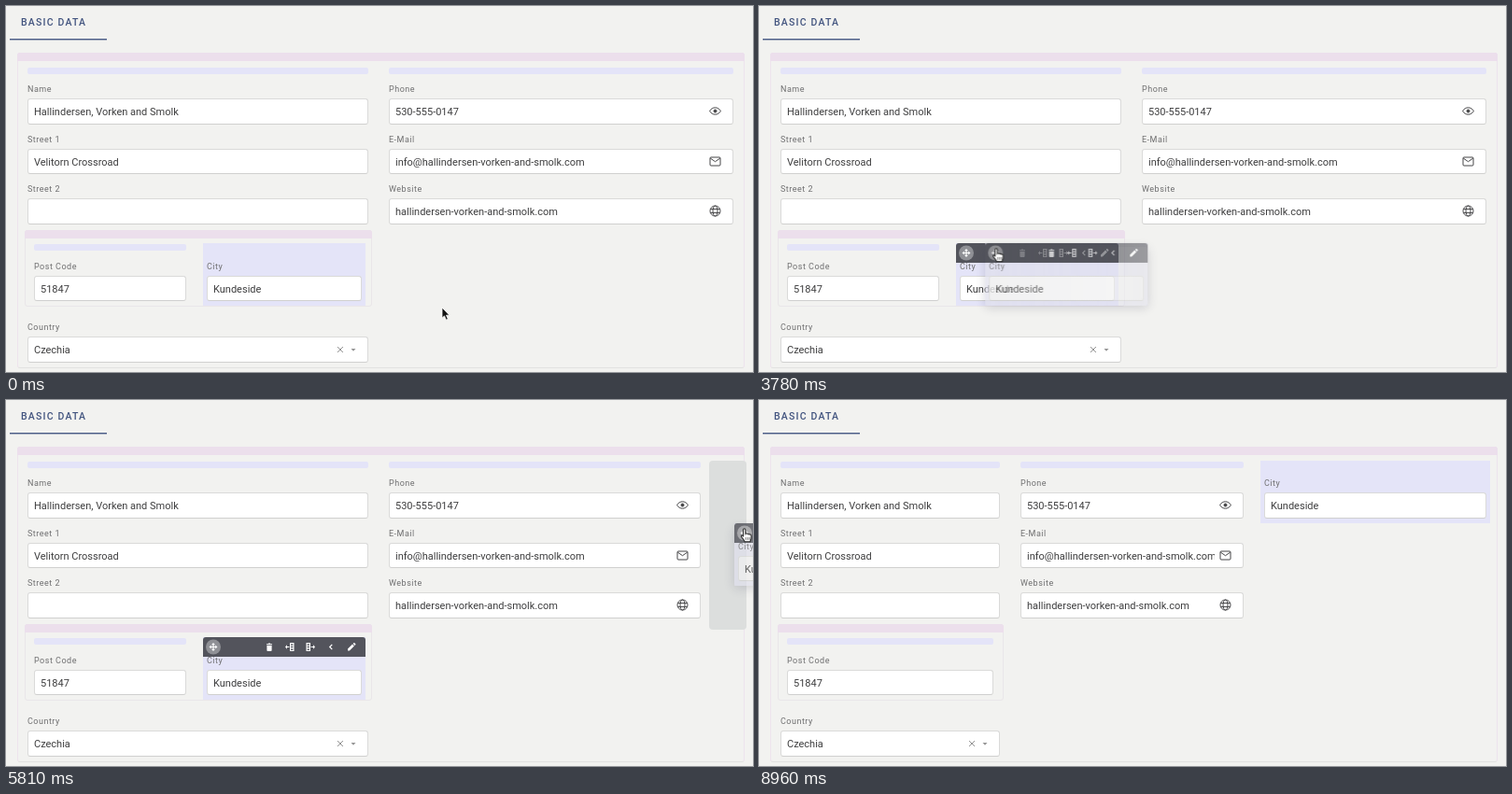
Recreate the animation shown at these times as an HTML page. Size 800 by 392 pixels, loop 9030 ms.

```html
<!DOCTYPE html>
<html lang="en">
<head>
<meta charset="utf-8">
<title>Form layout editor</title>
<style>
  html, body { margin: 0; width: 100%; height: 100%; overflow: hidden; background: #f2f2f0; }
  * { box-sizing: border-box; }
  .stage, .stage div, .cursor, .cursor svg { position: absolute; }
  .stage {
    left: 0; top: 0; width: 800px; height: 392px; overflow: hidden;
    font: 11px/28px Roboto, sans-serif; color: #3e3e3f; white-space: nowrap;
    animation: layout 9.03s step-end infinite;
  }

  .tab { left: 4px; top: 0; width: 104px; height: 36px; border-bottom: 1px solid #4a5c86;
    box-shadow: 0 1px rgba(74,92,134,.45);
    padding-left: 12px; font-size: 10.5px; line-height: 36px; font-weight: 500;
    letter-spacing: 1.2px; color: #42547f; }
  .outer { left: 12px; top: 50px; width: 779px; height: 338px; border: 1px solid #ede3ed; border-bottom-color: #e2e2e1; border-radius: 3px; }
  .nested { left: 20px; top: 239.5px; width: var(--nest); height: 82px; border: 1px solid #e9e6e9; border-radius: 3px; }
  .bar { left: -1px; right: -1px; top: -1px; height: 9px; background: #ecdfec; border-radius: 3px 3px 0 0; }
  .strip { height: 7.5px; background: #e4e4f8; border-radius: 2px; }

  .field { height: 43px; }
  .col1 { left: 23px; width: var(--w1); }
  .col2 { left: var(--x2); width: var(--w2); }
  .post { left: 30px; width: var(--post); }
  .label { left: 0; top: 0; font-size: 9px; line-height: 12px; letter-spacing: .5px; color: #6f6f70; }
  .input { left: 0; right: 0; top: 16px; height: 27.5px; background: #fff; border: 1px solid #dadad9; border-bottom-color: #d0d0cf; border-radius: 3px; }
  .input span { position: absolute; left: 6px; right: 30px; top: 0; overflow: hidden; }
  .input svg { position: absolute; right: 11px; top: 5px; width: 15px; height: 15px; }
  .input .clear { right: 7px; width: 26px; }

  .drop { left: 753px; top: 65px; width: 40px; height: 181px; background: #dcdedd; border-radius: 4px; opacity: var(--drop); }

  .city { left: var(--cx); top: var(--cy); width: var(--cw); height: 67px; }
  .tint { inset: 0; background: #e4e4f8; }
  .city .label, .ghost .label { left: 4px; top: 18.5px; }
  .city .input, .ghost .input { left: 4px; right: 4px; top: 34.5px; }
  .tools { left: 0; top: 0; width: 174px; height: 21px; background: #53545c; border-radius: 3px 3px 0 0; }
  .tools svg { display: block; }
  .city .tools { animation: tools 9.03s step-end infinite; }
  .spot1 { animation: handle 9.03s step-end infinite; }
  .spot2 { animation: addLeft 9.03s step-end infinite; }

  .ghost { left: 211px; top: 254px; width: 174px; height: 67px;
    animation: drag 9.03s linear infinite, ghost 9.03s step-end infinite; }
  .ghost .fade { inset: 0; -webkit-mask: linear-gradient(90deg, rgba(0,0,0,.82), rgba(0,0,0,.55));
    mask: linear-gradient(90deg, rgba(0,0,0,.82), rgba(0,0,0,.55)); }
  .ghost .halo { inset: 4px 0 0; box-shadow: 0 2px 12px rgba(60,60,90,.2); border-radius: 3px; }
  .ghost .tint { background: rgba(222,222,235,.85); }
  .ghost .input { background: #eeeeef; }

  .cursor { left: 0; top: 0; animation: move 9.03s linear infinite; }
  .cursor svg { overflow: visible; width: 16px; height: 20px; }
  .arrow { animation: arrow 9.03s step-end infinite; }
  .hand { left: -.5px; top: -1px; animation: hand 9.03s step-end infinite; }

  @keyframes layout {
    0% { --w1: 365px; --x2: 410px; --w2: 369px; --nest: 372px; --post: 163px;
      --cx: 211px; --cy: 254px; --cw: 174px; --drop: 0; }
    57.36% { --w1: 365px; --x2: 410px; --w2: 334px; --nest: 372px; --post: 163px;
      --cx: 211px; --cy: 254px; --cw: 174px; --drop: 1; }
    79.84%, 100% { --w1: 235px; --x2: 280px; --w2: 238.5px; --nest: 242px; --post: 221px;
      --cx: 537px; --cy: 64.5px; --cw: 246px; --drop: 0; }
  }
  @keyframes tools { 0% { opacity: 0; } 14.73% { opacity: 1; } 79.84%, 100% { opacity: 0; } }
  @keyframes handle { 0% { opacity: 0; } 34.11% { opacity: 1; } 79.84%, 100% { opacity: 0; } }
  @keyframes addLeft { 0% { opacity: 0; } 21.7% { opacity: 1; } 28.68%, 100% { opacity: 0; } }
  @keyframes ghost { 0% { opacity: 0; } 39.53% { opacity: 1; } 70.54%, 100% { opacity: 0; } }
  @keyframes arrow { 0% { opacity: 1; } 17.05% { opacity: 0; } 70.54%, 100% { opacity: 1; } }
  @keyframes hand { 0% { opacity: 0; } 17.05% { opacity: 1; } 70.54%, 100% { opacity: 0; } }
  @keyframes drag {
    0%, 38.76% { transform: translate(0, 0); }
    41.86% { transform: translate(31px, 0); }
    46.51% { transform: translate(155px, -33px); }
    53.49% { transform: translate(423px, -98px); }
    57.36% { transform: translate(525px, -115px); }
    64.34% { transform: translate(569px, -122px); }
    69.77%, 100% { transform: translate(554px, -120px); }
  }
  @keyframes move {
    0%, 8.53% { transform: translate(467px, 323px); }
    13.95% { transform: translate(387px, 298px); }
    17.72% { transform: translate(345px, 268px); }
    20.16% { transform: translate(326px, 261px); }
    23.26%, 26.58% { transform: translate(307px, 260px); }
    32.12% { transform: translate(240px, 261px); }
    34.88%, 38.76% { transform: translate(222px, 261px); }
    41.86% { transform: translate(254px, 261px); }
    46.51% { transform: translate(388px, 226px); }
    53.49% { transform: translate(659px, 159px); }
    57.36% { transform: translate(754px, 145px); }
    64.34% { transform: translate(791px, 139px); }
    69.77%, 84% { transform: translate(776.5px, 140px); }
    89.15% { transform: translate(750px, 210px); }
    94.57%, 100% { transform: translate(690px, 400px); }
  }
</style>
</head>
<body>
<svg width="0" height="0" style="position:absolute">
  <defs>
    <g id="icons" fill="#fff" stroke="none">
      <path d="M11 6l2 2.3h-1.4v1.6h1.6V8.500l2.300 2-2.300 2v-1.400h-1.600v1.600H13l-2 2.300-2-2.300h1.400v-1.600H8.800v1.400l-2.300-2 2.300-2v1.400h1.600V8.300H9z"/>
      <path d="M68 7.300h1.700l.5-.8h1.600l.5.8H74v1h-6zM68.400 9h5.200v5c0 .6-.3.9-.9.900h-3.400c-.6 0-.9-.3-.9-.9z"/>
      <g id="add"><path d="M88 10h2.400V8.200l2 2.300-2 2.300V11H88z" transform="rotate(180 90.200 10.500)"/>
        <path d="M93 6h4.500v9H93zm1.200 1.200v1.500h2.100V7.200zm0 2.600v1.500h2.100V9.800zm0 2.600v1.500h2.100v-1.500z" fill-rule="evenodd"/></g>
      <use href="#add" transform="matrix(-1 0 0 1 208 0)"/>
      <path d="M138.300 7.800l-2.600 2.700 2.600 2.700" fill="none" stroke="#fff" stroke-width="1.200"/>
      <path d="M155 14.500v-1.900l5-5 1.900 1.900-5 5zM160.600 7l.8-.8c.3-.3.600-.3.900 0l1 1c.3.3.3.6 0 .9l-.8.800z"/>
    </g>
  </defs>
</svg>

<div class="stage">
  <div class="tab">BASIC DATA</div>
  <div class="outer"><div class="bar"></div></div>
  <div class="strip col1" style="top:65.5px"></div>
  <div class="strip col2" style="top:65.5px"></div>
  <div class="nested"><div class="bar"></div></div>
  <div class="strip post" style="top:254.5px"></div>

  <div class="field col1" style="top:83px"><div class="label">Name</div><div class="input"><span>Hallindersen, Vorken and Smolk</span></div></div>
  <div class="field col1" style="top:136.5px"><div class="label">Street 1</div><div class="input"><span>Velitorn Crossroad</span></div></div>
  <div class="field col1" style="top:190px"><div class="label">Street 2</div><div class="input"></div></div>
  <div class="field post" style="top:272.5px"><div class="label">Post Code</div><div class="input"><span>51847</span></div></div>
  <div class="field col1" style="top:338px"><div class="label">Country</div><div class="input"><span>Czechia</span>
    <svg class="clear" viewBox="0 0 26 15"><path d="M1 5l6 6M7 5l-6 6" stroke="#959595" fill="none"/><path d="M15.500 7h5l-2.500 2.700z" fill="#959595"/></svg></div></div>

  <div class="field col2" style="top:83px"><div class="label">Phone</div><div class="input"><span>530-555-0147</span>
    <svg viewBox="0 0 15 15" fill="none" stroke="#454547"><path d="M1.600 7.500C4.200 2.600 10.800 2.600 13.400 7.500 10.800 12.400 4.200 12.400 1.600 7.500z"/><circle cx="7.500" cy="7.500" r="1.500" fill="#454547"/></svg></div></div>
  <div class="field col2" style="top:136.5px"><div class="label">E-Mail</div><div class="input"><span>info@hallindersen-vorken-and-smolk.com</span>
    <svg viewBox="0 0 15 15" fill="none" stroke="#454547"><rect x="2" y="3" width="11" height="9" rx="1"/><path d="M2.200 4l5.300 3.700L12.800 4"/></svg></div></div>
  <div class="field col2" style="top:190px"><div class="label">Website</div><div class="input"><span>hallindersen-vorken-and-smolk.com</span>
    <svg viewBox="0 0 15 15" fill="none" stroke="#454547"><circle cx="7.500" cy="7.500" r="5.500"/><ellipse cx="7.500" cy="7.500" rx="2.500" ry="5.500"/><path d="M2.500 5.600h10M2.500 9.400h10"/></svg></div></div>

  <div class="drop"></div>

  <div class="city">
    <div class="tint"></div>
    <div class="label">City</div>
    <div class="input"><span>Kundeside</span></div>
    <div class="tools"><svg width="174" height="21">
      <circle class="spot1" cx="11" cy="10.500" r="8" fill="#8f9095"/>
      <circle class="spot2" cx="93" cy="10.500" r="8" fill="#77787e"/>
      <use href="#icons"/></svg></div>
  </div>

  <div class="ghost">
    <div class="halo"></div>
    <div class="fade">
      <div class="tint"></div>
      <div class="label">City</div>
      <div class="input"><span>Kundeside</span></div>
      <div class="tools"><svg width="174" height="21"><circle cx="11" cy="10.500" r="8" fill="#9a9a9e"/><use href="#icons"/></svg></div>
    </div>
  </div>

  <div class="cursor">
    <svg class="arrow" viewBox="0 0 16 20"><path d="M0 0v11.200l2.500-2.300 1.900 4.300 2-.9-1.900-4.100h3.400z" fill="#111" stroke="#fff" stroke-width=".8"/></svg>
    <svg class="hand" viewBox="0 0 16 20"><g transform="scale(1.12)"><path d="M-1.300 1c0-1.500 2.100-1.500 2.100 0v3.600c.4-.7 1.700-.6 1.900.3.500-.6 1.700-.4 1.800.5.600-.4 1.800-.1 1.800 1v2.400c0 1.600-.9 2-1 3.500H.2C-.2 10.700-2 9.200-3 7.500c-.7-1.200.6-1.900 1.700-.6z" fill="#fff" stroke="#222" stroke-width=".9"/><path d="M1.200 8v2.600M3 8v2.600M4.700 8v2.600" stroke="#222" stroke-width=".5"/></g></svg>
  </div>
</div>
</body>
</html>
```
